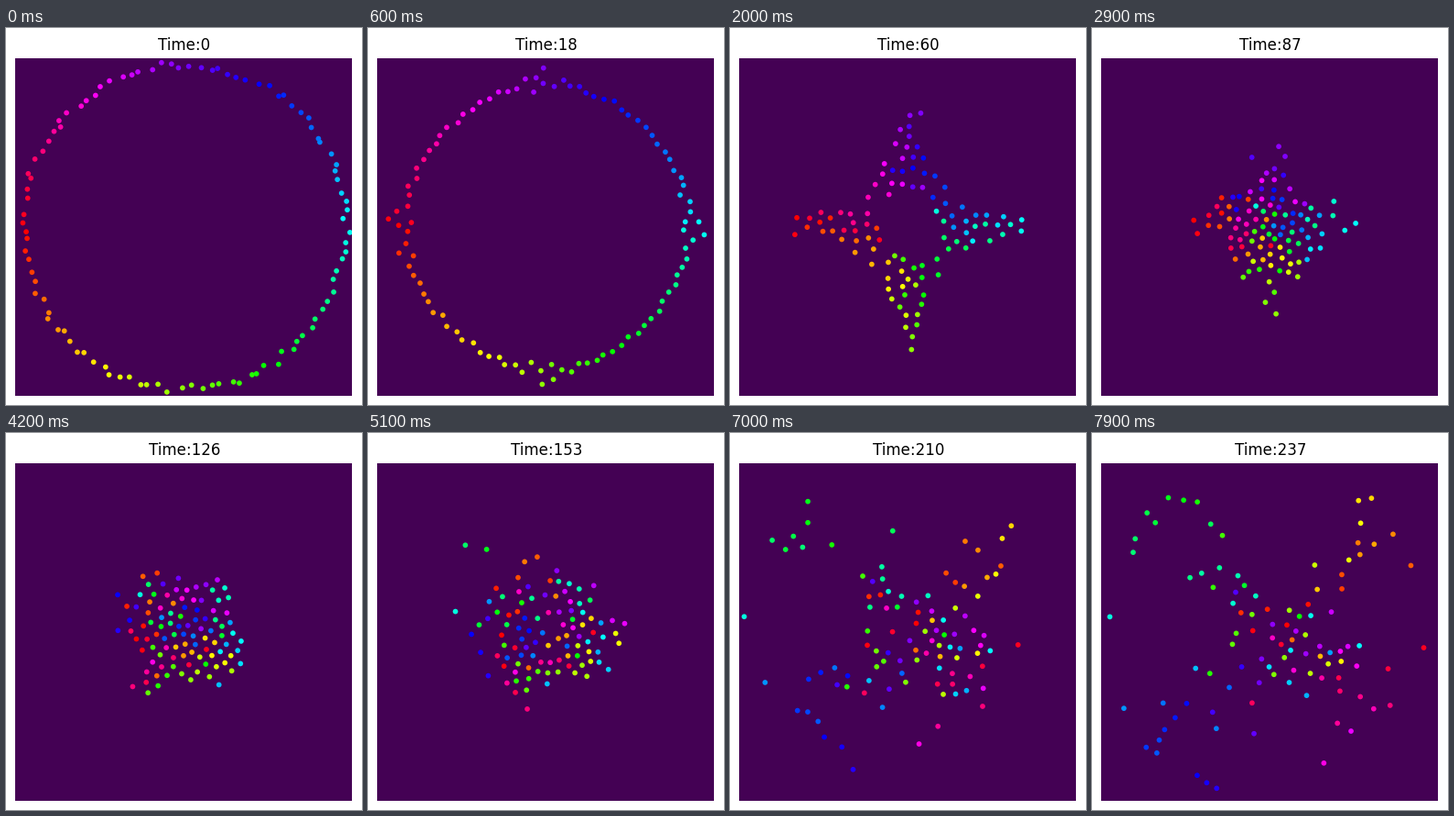
Recreate the animation shown at these times as a matplotlib script. Size 389 by 411 pixels, loop 8 s.

```python
import colorsys

import matplotlib.pyplot as plt
import numpy as np
from matplotlib.animation import FuncAnimation

W, H, DPI = 389, 411, 100
FRAMES, INTERVAL = 80, 100
STEPS_PER_FRAME, SUBSTEPS = 3, 4

N = 100
CENTER = np.array([195.0, 216.5])
RADIUS = 177
SPEED = 1.78      # top speed along each axis, px per step
RELAX = 9         # steps needed to reach the wanted speed
ARRIVE = 0.08     # slow-down rate near the goal
SPACING, SOFTNESS, MAX_PUSH = 11.2, 1.4, 1.2
JITTER, SETTLE = 4.5, 15    # uneven start, px, and steps to even out


def ring():
    a = (np.arange(N) + 0.5) * 2 * np.pi / N
    return RADIUS * np.column_stack([-np.cos(a), np.sin(a)])


def repulsion(pos):
    gap = pos[:, None] - pos[None]
    dist = np.hypot(gap[..., 0], gap[..., 1])
    np.fill_diagonal(dist, np.inf)
    dist = np.maximum(dist, 0.1)
    push = np.exp((SPACING - dist) / SOFTNESS) * SPEED / RELAX
    push = np.minimum(push, MAX_PUSH) / dist
    return (gap * push[..., None]).sum(axis=1)


def simulate():
    """Walk everyone to the opposite side of the ring; return all poses."""
    rng = np.random.default_rng(4)
    jitter = rng.uniform(-JITTER, JITTER, (N, 2))
    pos = ring()
    goal = -pos
    vel = np.zeros_like(pos)
    dt = 1 / SUBSTEPS
    poses = []
    for k in range(FRAMES):
        fade = np.exp(-k * STEPS_PER_FRAME / SETTLE)
        poses.append(CENTER + pos + jitter * fade)
        for _ in range(STEPS_PER_FRAME * SUBSTEPS):
            wanted = np.clip(ARRIVE * (goal - pos), -SPEED, SPEED)
            force = (wanted - vel) / RELAX + repulsion(pos)
            force += rng.normal(0, 0.04, pos.shape)
            vel += force * dt
            pos = pos + vel * dt
    return np.array(poses)


poses = simulate()
colors = [colorsys.hsv_to_rgb(i / N, 1, 1) for i in range(N)]

fig = plt.figure(figsize=(W / DPI, H / DPI), dpi=DPI, facecolor="white")
ax = fig.add_axes([10 / W, 10 / H, 368 / W, 368 / H], facecolor="#440154")
ax.set(xlim=(10, 378), ylim=(401, 33), xticks=[], yticks=[])
for spine in ax.spines.values():
    spine.set_visible(False)
title = ax.set_title("Time:0", x=185 / 368, pad=6.7, fontsize=12,
                     family="DejaVu Sans")
dots = ax.scatter(*poses[0].T, s=17, c=colors, linewidths=0)


def update(k):
    dots.set_offsets(poses[k])
    title.set_text(f"Time:{k * STEPS_PER_FRAME}")
    return dots, title


anim = FuncAnimation(fig, update, frames=FRAMES, interval=INTERVAL,
                     repeat=True, repeat_delay=0, blit=False)
plt.show()
```
